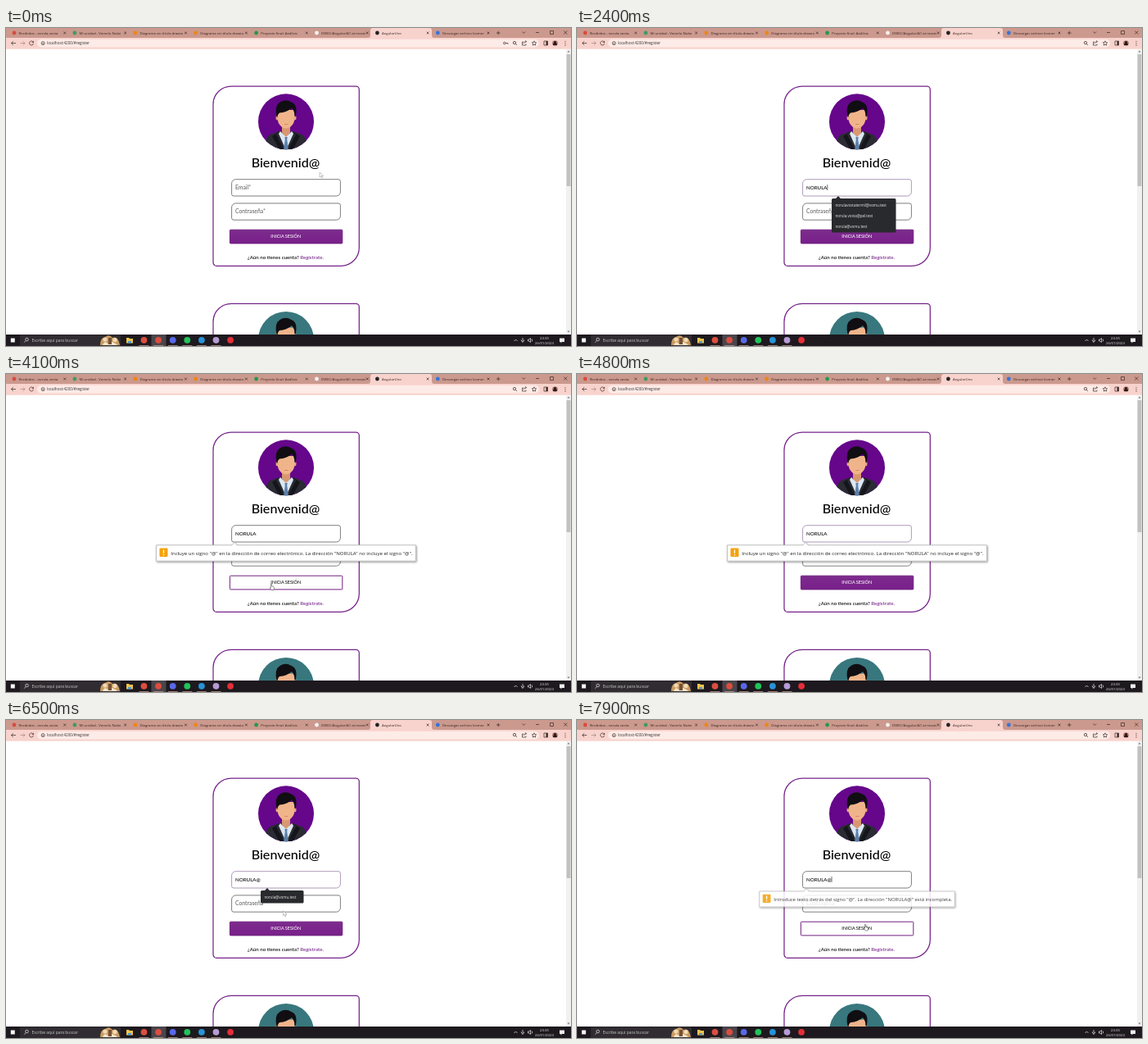
These frames come from a looping animation (690 by 388 pixels, 8000 ms). An HTML page:

```html
<!DOCTYPE html>
<html lang="es">
<head>
<meta charset="utf-8">
<title>Inicio de sesión</title>
<style>
  html, body { margin: 0; width: 100%; height: 100%; overflow: hidden; background: #fff; }
  svg { display: block; width: 100%; height: 100%; }
  text { font-family: "Open Sans", "Noto Sans", sans-serif; white-space: pre; }
  .form text { font-family: Lato, sans-serif; font-weight: 500; }
  .line { fill: none; stroke: #3a2925; stroke-width: .7; }
  .hint { font-size: 6.8px; fill: #666; }
  .light { fill: none; stroke: #eee; stroke-width: .7; }
</style>
</head>
<body>
<svg viewBox="0 0 690 388" preserveAspectRatio="none">
  <defs>
    <clipPath id="round"><circle cx="342" cy="114.300" r="34"/></clipPath>
    <linearGradient id="purple" x2="0" y2="1">
      <stop stop-color="#7d2b8d"/><stop offset="1" stop-color="#78208a"/>
    </linearGradient>
    <filter id="shadow" x="-5%" y="-30%" width="110%" height="180%">
      <feDropShadow dx=".8" dy="1.200" stdDeviation="1" flood-opacity=".4"/>
    </filter>
    <path id="card" d="M275 71H427.300a4 4 0 0 1 4 4V268a22.300 22.300 0 0 1-22.300 22.300H257a4 4 0 0 1-4-4V93a22 22 0 0 1 22-22Z"
      fill="#fff" stroke="#76238a" stroke-width="1.250"/>
    <path id="field" d="M280.600 184.700H406a2.400 2.400 0 0 1 2.400 2.400V200a5 5 0 0 1-5 5H278a2.400 2.400 0 0 1-2.400-2.400V189.700a5 5 0 0 1 5-5Z"
      fill="#fff" stroke-width=".75"/>
    <g id="person" clip-path="url(#round)">
      <path d="M337 116h10v12l-5 8-5-8z" fill="#d9976f"/>
      <path d="M316 150q0-17 7-20l12-4.500 7 9 7-9 12 4.500q7 3 7 20z" fill="#2a2b33"/>
      <path d="M335 126l-2 3 9 20 9-20-2-3-7 7z" fill="#dce7f2"/>
      <path d="M340.300 133h3.400l-.5 3 1.800 13h-6l1.800-13z" fill="#5b82ac"/>
      <path d="M334 126l-4 4 10 19h-6l-9-17zM350 126l4 4-10 19h6l9-17z" fill="#15161b"/>
      <path d="M331.500 100h21v9q0 7.500-5 11.500-5.500 4-11 0-5-4-5-11.500z" fill="#f0b48b"/>
      <ellipse cx="331" cy="109.500" rx="1.500" ry="2.800" fill="#e7a77e"/>
      <ellipse cx="353" cy="109.500" rx="1.500" ry="2.800" fill="#e7a77e"/>
      <path d="M330.500 108.500q-3-14 4-18 7-4.500 14 0 8.500 3 5 18l-1-1q0-6-3.500-10-6 5.500-15 6-2 1.500-2.500 5z" fill="#100e12"/>
      <path d="M340 117.500h4.500" stroke="#d97858" stroke-width=".8"/>
    </g>
  </defs>

  <rect width="690" height="388" fill="#fff"/>
  <g class="form">
    <use href="#card"/>
    <use href="#card" y="265.300"/>
    <circle cx="342" cy="114.300" r="34" fill="#65068b"/>
    <circle cx="342" cy="380" r="34" fill="#38777d"/>
    <use href="#person"/>
    <use href="#person" y="265.500"/>
    <text x="341.500" y="169.800" font-size="16.100" text-anchor="middle">Bienvenid@</text>
    <use href="#field" id="email"/>
    <use href="#field" y="29.200" stroke="#555"/>
    <text id="emailHint" class="hint" x="280" y="197">Email*</text>
    <text id="value" x="280" y="196.900" font-size="6.200"></text>
    <path id="caret" d="M0 191v7" stroke="#111" stroke-width=".6"/>
    <text class="hint" x="280" y="226.200">Contraseña*</text>
    <rect id="button" x="273.400" y="246.200" width="137.400" height="16.700" rx="1" fill="url(#purple)"/>
    <rect x="273.400" y="246.200" width="137.400" height="16.700" rx="1" fill="none" stroke="#702080"/>
    <text id="buttonText" x="341.800" y="256" font-size="5.500" text-anchor="middle">INICIA SESIÓN</text>
    <text x="341.500" y="281.700" font-size="6.150" text-anchor="middle">¿Aún no tienes cuenta? <tspan fill="#76238a">Regístrate.</tspan></text>
  </g>

  <g id="scrollbar">
    <rect x="684" y="26" width="6" height="348" fill="#f1f1f1"/>
    <rect x="684.600" y="32" width="4.800" height="161" fill="#c1c1c1"/>
    <path d="M685.500 29.500l1.500-2 1.500 2zM685.500 369.500l1.500 2 1.500-2z" fill="#777"/>
  </g>

  <g id="browser">
    <rect width="690" height="13" fill="#cb998e"/>
    <rect y="12" width="690" height="13.700" fill="#f8d3cd"/>
    <path d="M442 12q3 0 3-3V3q0-3 3-3h69q3 0 3 3v6q0 3 3 3z" fill="#f8d3cd"/>
    <rect x="38" y="13.700" width="613" height="9.800" rx="4.900" fill="#fdebe7"/>
    <g id="tabs"></g>
    <path class="line" d="M599 6h4.500M601.200 3.800v4.400M630.500 4.500l1.800 1.800 1.800-1.800M647 5.500h4M664.500 3.500h4v4h-4zM681.300 3.500l4 4m0-4l-4 4"/>
    <path class="line" d="M12 18.500H6.500m2.300-2.300l-2.300 2.300 2.300 2.300M33.300 17.300a2.500 2.500 0 1 0 .2 1.800m0-3.200v1.800h-1.800"/>
    <path class="line" opacity=".45" d="M17.500 18.500H23m-2.300-2.300l2.300 2.300-2.300 2.300"/>
    <circle class="line" cx="45.200" cy="18.600" r="2"/><path class="line" d="M45.200 18v1.800"/>
    <text x="50" y="20.200" font-size="4.600" fill="#333">localhost:4200/#register</text>
    <g id="key" class="line"><circle cx="608.800" cy="18.500" r="1.300"/><path d="M610 18.500h3v1.300"/></g>
    <circle class="line" cx="621" cy="18" r="1.700"/><path class="line" d="M622.300 19.300l1.700 1.700"/>
    <path class="line" d="M632 17h-1.500v4h4.500v-1.500M632 19q.5-2.500 3.500-2.500m-1.200-1.300l1.300 1.300-1.300 1.300"/>
    <path class="line" d="M645 15.800l.8 1.800 1.900.2-1.400 1.300.4 2-1.700-1-1.700 1 .4-2-1.400-1.300 1.900-.2z"/>
    <path class="line" d="M657 16h4.500v5H657z"/><path d="M659.500 16h2v5h-2z" fill="#3a2925"/>
    <circle cx="670.500" cy="18.500" r="3.300" fill="#a9786b"/><path d="M668 21q0-2.500 1.200-2.700-.8-2.300 1.300-2.300t1.300 2.300q1.200.2 1.200 2.700z" fill="#2b1c1d"/>
    <path d="M683 16.200v.1m0 2.200v.1m0 2.200v.1" stroke="#3a2925" stroke-width="1.100" stroke-linecap="round"/>
  </g>

  <g id="taskbar">
    <rect y="374" width="690" height="14" fill="#1d191e"/>
    <rect x="17" y="374.500" width="123" height="13.500" fill="#302c31"/>
    <rect x="5.800" y="378.500" width="5" height="5" fill="#f4f4f4"/>
    <circle class="light" cx="25.500" cy="380" r="1.800"/><path class="light" d="M24.200 381.500l-2 2.200"/>
    <text x="31.500" y="382.700" font-size="4.950" fill="#ccc">Escribe aquí para buscar</text>
    <path d="M115 387q0-9 6-10 5-4 9 1 7-3 9 9z" fill="#c99b62"/>
    <circle cx="121" cy="380" r="2.600" fill="#f1d9b2"/><circle cx="133" cy="380.500" r="2.600" fill="#f3ddb7"/>
    <path d="M118 387q3-7 7-1 4-6 11 1z" fill="#f5e7cd"/><path d="M125 378h4v8h-4z" fill="#765038"/>
    <rect x="177.500" y="374" width="18" height="14" fill="#4a454b"/>
    <path d="M147 378h3l1 1h4v5.500h-8z" fill="#f4c34b"/><path d="M149 382h4v2.500h-4z" fill="#4d9ad6"/>
    <g id="apps"></g>
    <path class="light" d="M620.500 382l2-2 2 2M631 378v3.500m-1.800-1q0 2 1.800 2t1.800-2m-1.800 2v1.500M637.500 380h1.300l1.700-1.500v5l-1.700-1.500h-1.300zM642 379.500q1.500 1.500 0 3"/>
    <g fill="#eee" font-size="4.300" text-anchor="middle">
      <text x="657.500" y="379.500">23:35</text><text x="657.500" y="385.800">26/01/2023</text>
    </g>
    <path d="M676 378.500h6v4.500h-3l-1.500 1.500v-1.500H676z" fill="#eee"/>
  </g>

  <g id="overlays"></g>
  <g id="cursor" stroke="#333" stroke-width=".5" fill="#fff" stroke-linejoin="round">
    <path id="arrow" d="M0 0v6l1.500-1.300 1 2.300 1-.5-1-2.200h2z" stroke="#888"/>
    <path id="hand" d="M0 0q1-.8 1.200.3V3l2.300.7q.7.300.5 1.300l-.5 2.500H.7L-1.200 5q0-1 1.200-.2z"/>
    <path id="beam" d="M-1 -3h2M0 -3v6M-1 3h2"/>
  </g>
</svg>
<script>
const LOOP = 8000, NAME = "NORULA";
const $ = id => document.getElementById(id);
const clamp = v => Math.max(0, Math.min(1, v));
const ramp = (t, start, length) => clamp((t - start) / length);
const within = (t, a, b) => t >= a && t < b;
const show = (id, visible) => $(id).setAttribute("visibility", visible ? "visible" : "hidden");

const tabs = [
  ["Recibidos - norula.vosta", "#d94b3e"], ["Mi unidad - Vomelu Nube", "#3f9b62"],
  ["Diagrama sin título.drawio", "#ed8617"], ["Diagrama sin título.drawio", "#ed8617"],
  ["Proyecto final: Análisis", "#26974d"], ["DWEC/Angular/A1 at master", "#f5f1ef"],
  ["AngularUno", "#222"], ["Descargar archivo (comer", "#3674d9"]
];
$("tabs").innerHTML = tabs.map(([title, color], i) => {
  const x = 10 + i * 73.9;
  return `<circle cx="${x}" cy="6" r="2.400" fill="${color}"/>
    <svg x="${x + 5.3}" y="0" width="54" height="12"><text x=".3" y="7.600" font-size="4.300" fill="#3a2620">${title}</text></svg>
    <path class="line" d="M${x + 60.3} 4.600l2.800 2.800m0-2.800l-2.800 2.800"/>`;
}).join("");

const apps = ["#db4e3f", "#db4e3f", "#5968ea", "#20c45a", "#2793d8", "#b79bd6", "#e52e38"];
$("apps").innerHTML = apps.map((color, i) => {
  const x = 168.5 + i * 17.6;
  return `<circle cx="${x}" cy="380.800" r="3.900" fill="${color}"/>
    ${i < 6 ? `<path d="M${x - 6} 387.500h12" stroke="#b99487" stroke-width=".8"/>` : ""}`;
}).join("");

const bubble = (id, x, width, message) => `
  <g id="${id}">
    <path filter="url(#shadow)" d="M${x} 208.800H276l3-3.600 3 3.600H${x + width}v19.400H${x}z" fill="#fff" stroke="#aaa" stroke-width=".7"/>
    <rect x="${x + 4}" y="212.600" width="10" height="10.400" rx="1" fill="#f4a20b"/>
    <path d="M${x + 9} 214.500v4.300m0 1.300v1.300" stroke="#fff" stroke-width="1.300"/>
    <text x="${x + 17.8}" y="220.700" font-size="6.050" fill="#222">${message}</text>
  </g>`;
const dropdown = (id, width, emails) => `
  <g id="${id}">
    <path d="M312.500 208H316l3-3 3 3h${width - 12}q1.500 0 1.500 1.500v${emails.length * 13 - .5}q0 1.500-1.500 1.500H312.500q-1.500 0-1.500-1.500V209.500q0-1.500 1.500-1.500z" fill="#292a2d"/>
    ${emails.map((email, i) => `<text x="315.500" y="${217.6 + i * 13}" font-size="4.500" fill="#eee">${email}</text>`).join("")}
  </g>`;
$("overlays").innerHTML =
  bubble("missingAt", 183.5, 317, `Incluye un signo "@" en la dirección de correo electrónico. La dirección "${NAME}" no incluye el signo "@".`) +
  bubble("incomplete", 220.5, 243, `Introduce texto detrás del signo "@". La dirección "${NAME}@" está incompleta.`) +
  dropdown("allEmails", 78, ["norulavostatermil@vomu.test", "norula.vosta@pel.test", "norula@vomu.test"]) +
  dropdown("oneEmail", 52, ["norula@vomu.test"]);

// Pointer stops: time, x, y
const route = [[0, 383, 176], [100, 383, 176], [600, 335, 195], [3200, 309, 196], [3500, 323.5, 256],
  [4150, 323.5, 256], [4450, 308, 196], [6250, 310, 196], [6650, 351.5, 249.5], [LOOP, 351.5, 249.5]];
function pointerAt(t) {
  const i = route.findIndex(stop => stop[0] > t);
  const [a, b] = [route[i - 1], route[i]];
  const p = ramp(t, a[0], b[0] - a[0]), ease = p * p * (3 - 2 * p);
  return [a[1] + (b[1] - a[1]) * ease, a[2] + (b[2] - a[2]) * ease];
}

function drawBubble(id, t, start, end) {
  const out = ramp(t, end, 320), scale = 1 - .05 * out;
  show(id, t >= start && out < 1);
  $(id).setAttribute("opacity", ramp(t, start, 120) * (1 - out * out));
  $(id).setAttribute("transform", `translate(342 218) scale(${scale}) translate(-342 -218)`);
}

function draw(t) {
  const letters = Math.max(0, Math.min(NAME.length, Math.floor((t - 1000) / 200)));
  const typed = NAME.slice(0, letters) + (t >= 5500 ? "@" : "");
  $("value").textContent = typed;
  show("emailHint", !typed);
  const caretX = 280.3 + (typed ? $("value").getComputedTextLength() : 0);
  $("caret").setAttribute("transform", `translate(${caretX} 0)`);
  show("caret", within(t, 600, 2730) || within(t, 3260, 3900) || within(t, 5500, 6030) || t >= 6560);

  const hover = ramp(t, 3400, 180) - ramp(t, 4200, 250) + ramp(t, 6600, 180);
  $("button").setAttribute("opacity", 1 - hover);
  $("buttonText").setAttribute("fill", hover > .5 ? "#111" : "#fff");
  const focused = within(t, 600, 3400) || within(t, 4200, 6600);
  $("email").setAttribute("stroke", focused ? "#957aa5" : "#555");

  show("key", t < 900);
  show("allEmails", within(t, 1200, 3900));
  show("oneEmail", within(t, 5500, 7200));
  drawBubble("missingAt", t, 3900, 5050);
  drawBubble("incomplete", t, 6880, 7780);

  const [x, y] = pointerAt(t);
  const visible = t < 1200 || within(t, 3200, 4500) || t >= 6250;
  const onField = y > 184 && y < 205, onButton = y > 245;
  $("cursor").setAttribute("transform", `translate(${x} ${y})`);
  show("arrow", visible && !onField && !onButton);
  show("hand", visible && onButton);
  show("beam", visible && onField);
}

function frame() {
  draw(performance.now() % LOOP);
  requestAnimationFrame(frame);
}
frame();
</script>
</body>
</html>
```
